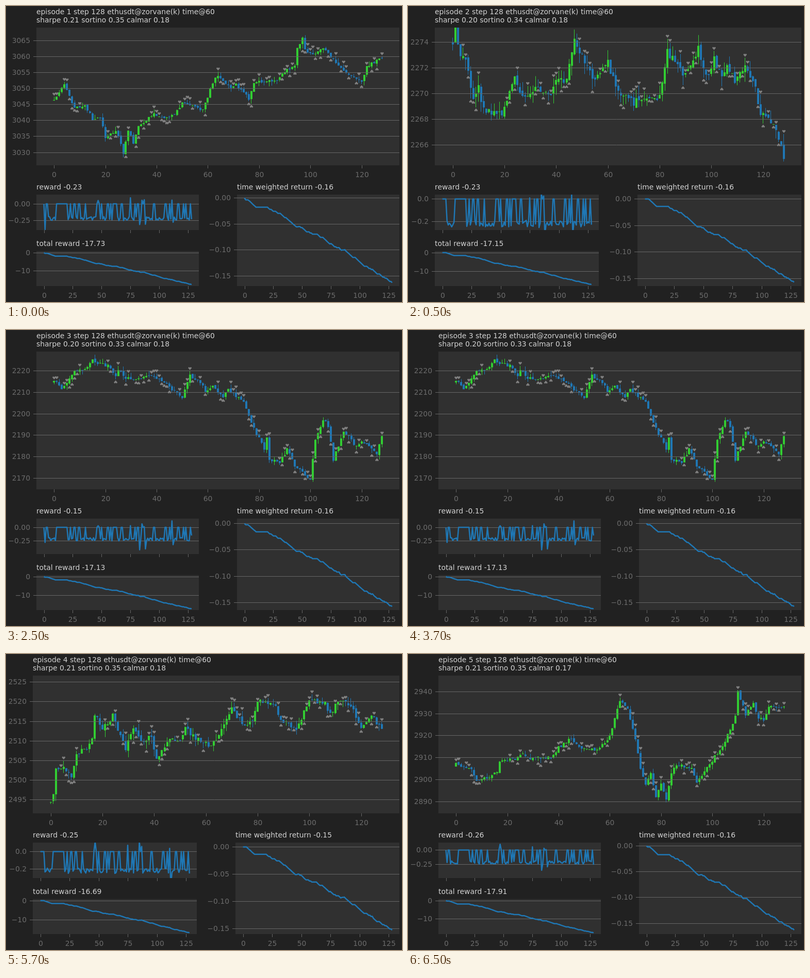
Recreate the animation shown at these times as an HTML page with a canvas. Size 768 by 576 pixels, loop 8000 ms.

```html
<!DOCTYPE html>
<html>
<head>
<meta charset="utf-8">
<style>
html, body { margin: 0; width: 100%; height: 100%; overflow: hidden; background: #212121; }
canvas { display: block; }
</style>
</head>
<body>
<canvas id="stage" width="768" height="576"></canvas>
<script>
const ctx = document.getElementById('stage').getContext('2d');
const BLUE = '#1f77b4', GREEN = '#32cd32', GRID = '#666666', TICK = '#6b6b6b';
const STARTS = [0, 500, 2500, 4500, 6500], LOOP = 8000, LAST = 128;

// Runs of steps without a trade: no marker and no loss. On all other steps the agent buys or sells.
const IDLE = [[2, 3], [11, 20], [23], [26, 27], [30, 31], [36], [46, 48], [50], [55, 56], [58], [60, 63],
  [67, 68], [75], [79], [81, 82], [85, 87], [95, 96], [105, 106], [109], [111], [116, 117], [121], [123], [127]];
const BUYS = [[6, 9], [22, 24], [28], [32, 33], [35, 37], [42, 45], [54], [59], [65, 66], [76, 77], [89], [92], [94],
  [97, 98], [102], [104], [107, 108], [112], [115], [118], [120], [124], [126]];
const GAINS = [47, 75, 85, 87, 111], LOSSES = [1, 83, 88, 112];

// path: a few [step, y] points the price runs through; noise: its jitter in pixels.
// Axes: [top label, label step, top y, y step, label count, digits].
const episodes = [
  { ratios: 'sharpe 0.21 sortino 0.35 calmar 0.18',
    reward: -0.23, total: -17.73, ret: -0.1625, noise: 6,
    axis: [3065, -5, 67, 31.15, 8, 0], rewardAxis: [0, -0.25, 385, 32.5, 2, 2],
    totalAxis: [0, -10, 480, 35, 2, 0], retAxis: [0, -0.05, 373.5, 50.7, 4, 2],
    path: [[0, 180], [4, 155], [8, 200], [12, 193], [15, 220], [18, 217], [20, 257], [24, 242], [27, 286],
      [29, 240], [31, 266], [33, 234], [39, 208], [43, 220], [47, 212], [50, 190], [58, 202], [62, 150],
      [64, 134], [69, 162], [71, 154], [76, 180], [78, 148], [86, 147], [90, 128], [94, 115], [95, 84],
      [97, 62], [98, 85], [102, 95], [105, 83], [113, 124], [120, 150], [122, 118], [128, 100]] },

  { ratios: 'sharpe 0.20 sortino 0.34 calmar 0.18',
    reward: -0.23, total: -17.15, ret: -0.157, noise: 14,
    axis: [2274, -2, 70, 50, 5, 0], rewardAxis: [0, -0.2, 375.5, 43.5, 2, 1],
    totalAxis: [0, -10, 480, 36.2, 2, 0], retAxis: [0, -0.05, 375.5, 51.6, 4, 2],
    path: [[0, 68], [1, 42], [3, 96], [5, 105], [8, 185], [10, 160], [12, 200], [19, 210], [24, 136], [27, 180],
      [32, 158], [37, 178], [40, 150], [44, 140], [47, 66], [54, 142], [60, 110], [63, 160], [70, 188], [75, 176],
      [80, 178], [83, 90], [86, 106], [90, 136], [95, 82], [98, 140], [101, 105], [104, 134], [106, 112],
      [109, 144], [113, 112], [117, 162], [119, 212], [122, 215], [125, 246], [128, 295]] },

  { ratios: 'sharpe 0.20 sortino 0.33 calmar 0.18',
    reward: -0.15, total: -17.13, ret: -0.157, noise: 6,
    axis: [2220, -10, 79.5, 41.8, 6, 0], rewardAxis: [0, -0.25, 384, 26.5, 2, 2],
    totalAxis: [0, -10, 480, 36.5, 2, 0], retAxis: [0, -0.05, 376.5, 51.4, 4, 2],
    path: [[0, 98], [3, 113], [8, 82], [12, 78], [15, 60], [21, 70], [24, 88], [25, 76], [28, 95], [39, 91],
      [44, 106], [48, 124], [50, 130], [53, 88], [57, 103], [59, 118], [62, 111], [66, 130], [68, 117],
      [74, 142], [77, 182], [79, 202], [82, 230], [83, 208], [84, 252], [88, 258], [91, 233], [94, 264],
      [100, 292], [102, 215], [105, 173], [107, 188], [109, 252], [113, 196], [118, 228], [120, 214],
      [126, 240], [128, 206]] },

  { ratios: 'sharpe 0.21 sortino 0.35 calmar 0.18',
    reward: -0.25, total: -16.69, ret: -0.153, noise: 9,
    axis: [2525, -5, 54.9, 38.05, 7, 0], rewardAxis: [0, -0.2, 384.5, 34, 2, 1],
    totalAxis: [0, -10, 480, 37.5, 2, 0], retAxis: [0, -0.05, 375.5, 52.9, 4, 2],
    path: [[0, 284], [1, 274], [2, 224], [6, 224], [8, 244], [10, 196], [14, 182], [16, 160], [17, 116], [20, 145],
      [24, 120], [29, 185], [32, 146], [36, 172], [39, 158], [41, 206], [45, 170], [50, 166], [52, 145],
      [56, 164], [62, 180], [66, 148], [70, 108], [75, 142], [78, 125], [80, 92], [87, 100], [89, 130],
      [95, 146], [100, 92], [106, 96], [108, 118], [111, 92], [116, 100], [120, 146], [124, 120], [128, 148]] },

  { ratios: 'sharpe 0.21 sortino 0.35 calmar 0.17',
    reward: -0.26, total: -17.91, ret: -0.163, noise: 6,
    axis: [2940, -10, 73.5, 42.7, 6, 0], rewardAxis: [0, -0.25, 381.5, 27.5, 2, 2],
    totalAxis: [0, -10, 480, 35, 2, 0], retAxis: [0, -0.05, 373.5, 50.2, 4, 2],
    path: [[0, 214], [6, 226], [8, 247], [13, 238], [16, 228], [17, 207], [23, 206], [26, 193], [29, 202],
      [37, 202], [40, 182], [45, 163], [48, 180], [55, 188], [60, 160], [64, 92], [67, 108], [70, 165],
      [72, 222], [74, 255], [76, 232], [78, 278], [80, 252], [82, 282], [84, 232], [86, 214], [92, 222],
      [94, 250], [100, 207], [105, 170], [109, 122], [110, 72], [113, 118], [116, 93], [118, 126],
      [120, 127], [122, 103], [128, 101]] }
];

function random(seed, i) {
  const v = Math.sin(seed * 91.7 + i * 12.9898) * 43758.5453;
  return v - Math.floor(v);
}

const within = (runs, i) => runs.some(([a, b = a]) => i >= a && i <= b);

function along(path, i) {
  const k = Math.max(1, path.findIndex(([step]) => step >= i));
  const [[a, ya], [b, yb]] = [path[k - 1], path[k]];
  return ya + (yb - ya) * (i - a) / (b - a);
}

// Adds candles plus the reward and running total series to an episode.
function prepare(ep, n) {
  const early = n % 2 === 0;
  const totals = [];
  let sum = 0, last = ep.path[0][1] + 4;
  ep.left = early ? 59 : 52;
  ep.candles = [];
  ep.rewards = [];
  for (let i = 0; i <= LAST; i++) {
    const idle = within(IDLE, i) || i < 2 && !early;
    const jitter = k => random(n + k, i) - .5;
    const open = last + jitter(20) * ep.noise * .6;
    const end = along(ep.path, i) + jitter(30) * ep.noise;
    const high = Math.min(open, end) - random(n + 5, i) ** 2 * ep.noise * 1.5;
    const low = Math.max(open, end) + random(n + 9, i) ** 2 * ep.noise * 1.5;
    const side = idle ? 0 : within(BUYS, i) ? 1 : -1;
    ep.candles.push({ open, end, high, low, side });
    last = end;

    let reward = idle || i === 0 ? 0 : -.19 - random(n + 2, i) * .06;
    if (GAINS.includes(i)) reward += random(n + 3, i) * .12;
    if (LOSSES.includes(i) && !idle) reward -= random(n + 4, i) * .2;
    if (i === LAST) reward = ep.reward;
    ep.rewards.push(reward);
    totals.push(sum += reward);
  }
  ep.totals = totals.map(v => v * ep.total / sum);
  ep.returns = totals.map(v => v * ep.ret / sum);
}

function text(str, x, y, color = '#d3d3d3', align = 'left') {
  ctx.fillStyle = color;
  ctx.textAlign = align;
  ctx.fillText(str, x, y);
}

function line(x1, y1, x2, y2) {
  ctx.beginPath();
  ctx.moveTo(x1, y1);
  ctx.lineTo(x2, y2);
  ctx.stroke();
}

function clipped({ x, y, w, h }, paint) {
  ctx.save();
  ctx.beginPath();
  ctx.rect(x, y, w, h);
  ctx.clip();
  paint();
  ctx.restore();
}

function background({ x, y, w, h }) {
  ctx.fillStyle = '#303030';
  ctx.fillRect(x, y, w, h);
}

// Grid lines, ticks and labels.
function axes({ x, y, w, h, x0, dx }, [top, step, y0, dy, count, digits], every, labels = true) {
  ctx.strokeStyle = GRID;
  ctx.lineWidth = 1;
  for (let k = 0; k < count; k++) {
    const gy = Math.floor(y0 + k * dy) + .5;
    const label = (top + k * step).toFixed(digits).replace('-', '\u2212');
    line(x - 6, gy, x + w, gy);
    text(label, x - 12, gy + 4.5, TICK, 'right');
  }
  for (let i = 0; i <= LAST; i += every) {
    const gx = Math.round(x0 + i * dx) + .5;
    line(gx, y + h, gx, y + h + 6);
    if (labels) text(i, gx, y + h + 23, TICK, 'center');
  }
}

function marker(x, y, side) {
  ctx.save();
  ctx.translate(x, y);
  ctx.scale(1, -side);
  ctx.fillStyle = '#808080';
  ctx.beginPath();
  [[-3.5, -1], [-2, -3], [0, -1.8], [2, -3], [3.5, -1], [0, 3]].forEach(p => ctx.lineTo(...p));
  ctx.fill();
  ctx.restore();
}

function priceChart(ep) {
  const x = ep.left, w = 763 - x, dx = w / 141.7;
  const box = { x, y: 42, w, h: 268, x0: x + w / 22 + dx * .4 + .4, dx };
  const at = i => box.x0 + i * dx;
  background(box);
  clipped(box, () => ep.candles.forEach(({ open, end, high, low }, i) => {
    ctx.fillStyle = end < open ? GREEN : BLUE;
    ctx.fillRect(Math.floor(at(i)), high, 1, low - high);
    ctx.fillRect(Math.round(at(i) - 2), Math.min(open, end), 4, Math.max(1, Math.abs(open - end)));
  }));
  axes(box, ep.axis, 20);
  ep.candles.forEach(({ high, low, side }, i) => {
    if (side) marker(at(i), side > 0 ? low + 5 : high - 5, side);
  });
}

function lineChart(title, series, axis, x, y, w, h, labels = true) {
  const [, step, y0, dy] = axis, dx = w / 140.8;
  const box = { x, y, w, h, x0: x + w / 22 + .2, dx };
  background(box);
  axes(box, axis, 25, labels);
  text(title, x, y - 10);
  clipped(box, () => {
    ctx.strokeStyle = BLUE;
    ctx.lineWidth = 2.5;
    ctx.lineJoin = 'round';
    ctx.beginPath();
    series.forEach((v, i) => ctx.lineTo(box.x0 + i * dx, y0 + v / step * dy));
    ctx.stroke();
  });
}

function draw(n) {
  const ep = episodes[n], x = ep.left;
  const [w, right] = x === 59 ? [315, 448] : [318, 445];
  ctx.fillStyle = '#212121';
  ctx.fillRect(0, 0, 768, 576);
  ctx.font = '13.89px "DejaVu Sans", sans-serif';
  text(`episode ${n + 1} step 128 ethusdt@zorvane(k) time@60`, x, 16);
  text(ep.ratios, x, 32);
  priceChart(ep);
  lineChart(`reward ${ep.reward.toFixed(2)}`, ep.rewards, ep.rewardAxis, x, 367, w, 69, false);
  lineChart(`total reward ${ep.total}`, ep.totals, ep.totalAxis, x, 477, w, 68);
  lineChart(`time weighted return ${ep.ret.toFixed(2)}`, ep.returns, ep.retAxis, right, 367, 763 - right, 178);
}

episodes.forEach(prepare);
const begin = performance.now();
let shown = -1;

function tick() {
  const t = (performance.now() - begin) % LOOP;
  const n = STARTS.findLastIndex(s => t >= s);
  if (n !== shown) draw(shown = n);
  requestAnimationFrame(tick);
}
tick();
</script>
</body>
</html>
```
